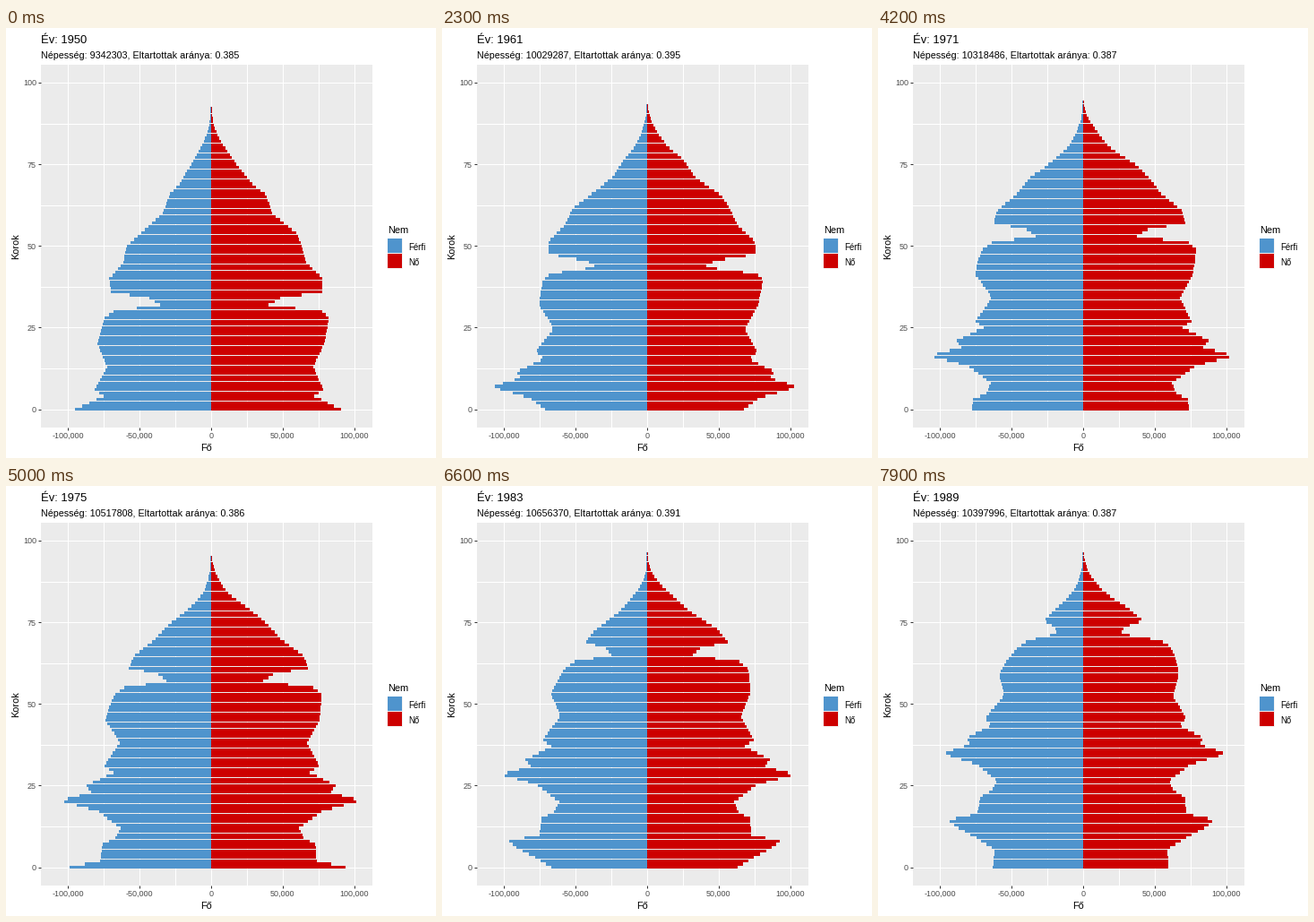
Recreate the animation shown at these times as a matplotlib script. Size 480 by 480 pixels, loop 8 s.

```python
import numpy as np
import matplotlib.pyplot as plt
from matplotlib.animation import FuncAnimation
from matplotlib.patches import Rectangle

plt.rcParams["font.family"] = "Liberation Sans"

SIZE, DPI = 480, 72
FRAMES, STEP = 80, 100
START = 1950
AGES = np.arange(101)
BLUE, RED = "#4F94CD", "#CD0000"
LEFT, TOP, RIGHT, BOTTOM = 39, 41, 409, 446
X0, X_UNIT = 228.9, .0015965    # pixel of zero, pixels per person
Y0, Y_UNIT = 425.66, 3.6475     # pixel of age zero, pixels per year

# Turning points of the birth curve: (birth year, thousand boys)
BIRTHS = [(1856, 15), (1870, 36), (1881, 43), (1884, 49), (1890, 49),
          (1900, 74), (1905, 74), (1910, 83), (1914, 80), (1916, 49),
          (1918, 40), (1920, 76), (1922, 82), (1930, 85), (1937, 76),
          (1944, 83), (1946, 76), (1950, 95), (1952, 91), (1954, 108),
          (1955, 110), (1956, 100), (1958, 83), (1963, 66), (1966, 69),
          (1968, 77.5), (1973, 78), (1975, 99), (1977, 93), (1980, 79),
          (1984, 63), (1990, 63)]
# Women per man by birth year, before mortality
SEX_RATIO = [(1860, .6), (1875, .88), (1885, 1.06), (1896, 1.07), (1900, .96),
             (1910, 1.01), (1920, 1.075), (1930, .96), (1990, .945)]
# Year, population, dependency ratio
HEADLINE = [(1950, 9342303, .385), (1955, 9828833, .392), (1961, 10029287, .395),
            (1971, 10318486, .387), (1978, 10667299, .386),
            (1983, 10656370, .391), (1989, 10397996, .387)]


def curve(points, x, column=1):
    cols = list(zip(*points))
    return np.interp(x, cols[0], cols[column])


def survival(linear, scale, rate):
    """Gompertz-Makeham share still alive at each age."""
    return np.exp(-linear * AGES - scale * np.expm1(rate * AGES))


MEN_ALIVE = survival(.0033, .00044, .1)
WOMEN_ALIVE = survival(.0015, .000207, .105)


def pyramid(year):
    """Men and women by age in a whole year."""
    born = year - AGES
    boys = 1000 * curve(BIRTHS, born)
    girls = boys * curve(SEX_RATIO, born)
    # Young adults who left after 1956
    left = (year > 1956) * np.exp(-((born - 1936) / 5) ** 2)
    # Milder mortality in the middle decades
    mild = np.sin(np.pi * (year - START) / 40) * np.clip((AGES - 30) / 15, 0, 1)
    men = boys * MEN_ALIVE * (1 - .06 * left) * (1 + .07 * mild)
    women = girls * WOMEN_ALIVE * (1 - .02 * left) * (1 + .02 * mild)
    return np.array([men, women])


fig = plt.figure(figsize=(SIZE / DPI, SIZE / DPI), dpi=DPI, facecolor="white")


def label(x, y, text, size, **kw):
    return fig.text(x / SIZE, 1 - y / SIZE, text, fontsize=size, **kw)


def box(x, y, w, h, color):
    fig.add_artist(Rectangle((x / SIZE, 1 - (y + h) / SIZE), w / SIZE, h / SIZE,
                             color=color, lw=0))


ax = fig.add_axes([LEFT / SIZE, 1 - BOTTOM / SIZE,
                   (RIGHT - LEFT) / SIZE, (BOTTOM - TOP) / SIZE])
ax.set_facecolor("#EBEBEB")
ax.spines[:].set_visible(False)

x_ticks = np.arange(-100000, 100001, 50000)
y_ticks = np.arange(0, 101, 25)
ax.set_xticks(x_ticks, [f"{v:,}" for v in x_ticks])
ax.set_yticks(y_ticks, [str(v) for v in y_ticks])
ax.tick_params(length=3, width=1, color="#333333", labelcolor="#4D4D4D",
               labelsize=9, pad=2)
for x in np.arange(-100000, 100001, 25000):
    ax.axvline(x, color="white", lw=1, zorder=0)
for y in np.arange(0, 101, 12.5):
    ax.axhline(y, color="white", lw=1, zorder=0)

sides = [(ax.barh(AGES, 0 * AGES, height=.9, color=color, lw=0, zorder=3), sign)
         for color, sign in [(BLUE, -1), (RED, 1)]]
ax.set_xlim((LEFT - X0) / X_UNIT, (RIGHT - X0) / X_UNIT)
ax.set_ylim((Y0 - BOTTOM) / Y_UNIT, (Y0 - TOP) / Y_UNIT)

title = label(39, 17, "", 13)
subtitle = label(39, 34, "", 10.75)
label(224, 472.5, "Fő", 11, ha="center")
label(11.5, 244, "Korok", 11, rotation=90, ha="center", va="center")
label(426, 229, "Nem", 11)
box(426, 235, 17, 34, "#F2F2F2")
for y, color, name in [(235, BLUE, "Férfi"), (252, RED, "Nő")]:
    box(426, y, 16, 16, color)
    label(449, y + 13, name, 9.6)


def update(frame):
    t = frame / 2
    year = START + frame // 2
    now = pyramid(year)
    if frame % 2:
        now = (now + pyramid(year + 1)) / 2
    oldest = int(92 + t / 8.2)
    for (bars, sign), people in zip(sides, now):
        widths = np.where(AGES <= oldest, np.maximum(people, 400), 0)
        for bar, w in zip(bars, widths):
            bar.set_width(sign * w)
    total = round(curve(HEADLINE, year))
    ratio = curve(HEADLINE, year, 2)
    title.set_text(f"Év: {year}")
    subtitle.set_text(f"Népesség: {total}, Eltartottak aránya: {ratio:.3f}")


anim = FuncAnimation(fig, update, frames=FRAMES, interval=STEP,
                     init_func=lambda: update(0), repeat=True, repeat_delay=0)
plt.show()
```
